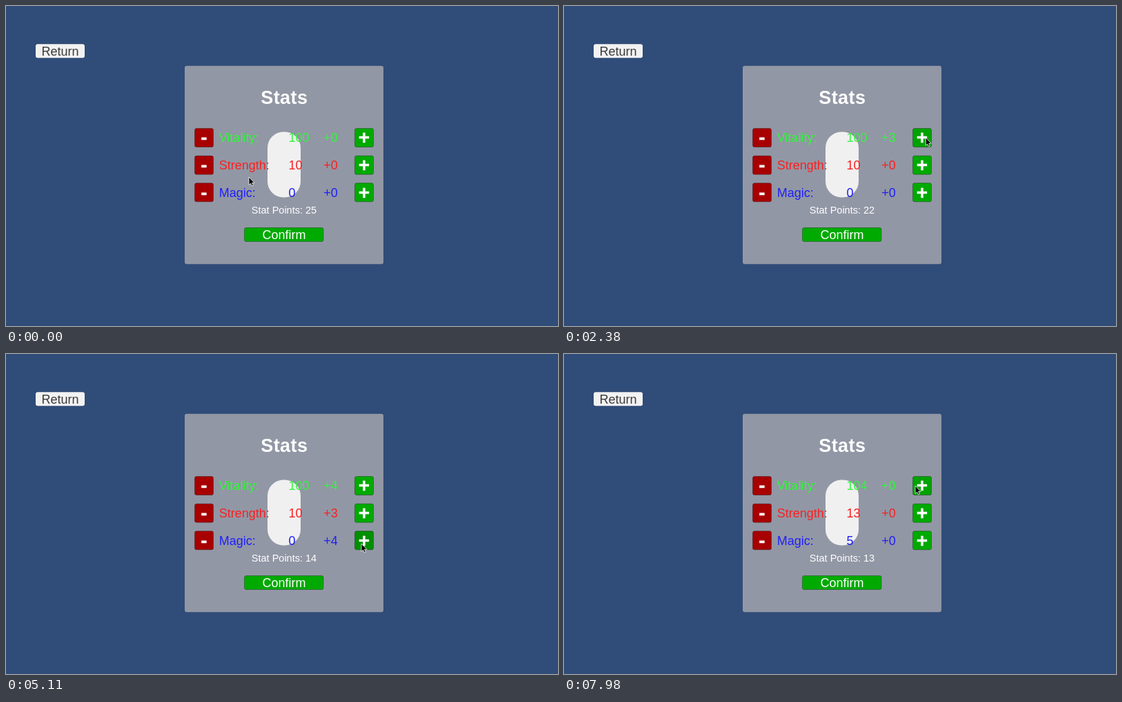
Animation, 800 px wide and 464 px high, one loop 8 s. Source, as an HTML page:

```html
<!DOCTYPE html>
<html lang="en">
<head>
<meta charset="utf-8">
<title>Stats panel</title>
<style>
  html, body { margin: 0; width: 100%; height: 100%; overflow: hidden; background: #304c78; }
  svg { display: block; width: 100%; height: 100%; }
  text { font: 18px "Liberation Sans", Arial, sans-serif; fill: #fff; }
  .middle { text-anchor: middle; }
  .title { font-size: 27px; font-weight: bold; letter-spacing: .4px; }
  .sign { font-size: 28px; font-weight: bold; stroke: #fff; stroke-width: .4px; }
  .small { font-size: 14.5px; }
  .button { stroke: #000; stroke-opacity: .3; }
</style>
</head>
<body>
<svg id="stage" viewBox="0 0 800 464"></svg>
<script>
const stage = document.getElementById('stage');
const LOOP = 8000, STEP = 70;
const GREEN = 170, RED = 168;

function add(tag, attributes, content = '') {
  const node = document.createElementNS('http://www.w3.org/2000/svg', tag);
  for (const name in attributes) node.setAttribute(name, attributes[name]);
  node.textContent = content;
  return stage.appendChild(node);
}
const box = (x, y, width, height, rx, fill, cls = '') =>
  add('rect', { x, y, width, height, rx, fill, class: cls });
const label = (content, x, y, cls = '', fill = '') =>
  add('text', { x, y, class: cls, style: fill && `fill:${fill}` }, content);
const button = (x, y, width, height, fill) =>
  box(x + .5, y + .5, width - 1, height - 1, 2.5, fill, 'button');

box(43, 55.3, 71, 20, 3, '#f2f2f2');
label('Return', 78.5, 71.5, 'middle', '#3a3a3a');
box(259, 86.8, 288, 287.4, 3, '#9297a5');
box(379, 182.5, 48, 95, 23, '#f0f0f0');
label('Stats', 403.3, 142.3, 'middle title');

// Each click time is the moment a point is added to that row.
const rows = [
  { name: 'Vitality:', base: 100, y: 191, color: '#32f53c', clicks: [1820, 2100, 2380, 2660] },
  { name: 'Strength:', base: 10, y: 230.7, color: '#fa2020', clicks: [3290, 3570, 3850] },
  { name: 'Magic:', base: 0, y: 270.3, color: '#2020f5', clicks: [4410, 4620, 4830, 5040 - STEP, 5180] }
];
for (const row of rows) {
  const { y, color } = row;
  button(273, y - 14, 28, 28, `rgb(${RED},0,0)`);
  label('-', 286.8, y + 9.2, 'middle sign');
  row.plus = button(505, y - 14, 28, 28);
  label('+', 519, y + 9.2, 'middle sign');
  label(row.name, 308.7, y + 6.2, '', color);
  row.value = label('', 409.5, y + 6.2, '', color);
  row.bonus = label('', 460.3, y + 6.2, '', color);
}
const points = label('', 403, 301.3, 'middle small');
const confirmButton = button(345, 321, 115.5, 21);
label('Confirm', 403, 338, 'middle');
const CONFIRM_TIME = 6230;

const cursor = add('path', {
  d: 'M0 0V11.5L2.6 9.2L4.4 13L6.3 12.1L4.6 8.4H8Z',
  fill: '#000', stroke: '#fff', 'stroke-width': .8
});

// Time, x, y of the pointer tip.
const path = [
  [0, 352, 248], [1050, 352, 248], [1260, 494, 203], [1470, 496, 202], [1610, 525, 190],
  [2730, 524, 191], [3080, 518, 239], [3150, 518, 240], [3920, 518, 239], [4060, 518, 245],
  [4200, 517, 251], [4410, 515, 274], [5110, 515, 275], [5390, 515, 275], [6020, 435, 329],
  [6160, 434, 329], [6580, 434, 329], [7350, 510, 193], [7980, 509, 191], [LOOP, 509, 191]
];

function pointerAt(time) {
  const i = path.findIndex(key => key[0] > time);
  const [t0, x0, y0] = path[i - 1], [t1, x1, y1] = path[i];
  const p = (time - t0) / (t1 - t0), eased = p * p * (3 - 2 * p);
  return [x0 + (x1 - x0) * eased, y0 + (y1 - y0) * eased];
}

function paintButton(node, [px, py], pressed) {
  const edge = name => +node.getAttribute(name);
  const inside = px >= edge('x') && px <= edge('x') + edge('width') &&
    py >= edge('y') && py <= edge('y') + edge('height');
  const shade = pressed ? .84 : inside ? .95 : 1;
  node.setAttribute('fill', `rgb(0,${Math.round(GREEN * shade)},0)`);
}

const isPressed = (time, click) => time >= click - 2 * STEP && time < click;

function draw(now) {
  const time = Math.floor((now % LOOP) / STEP) * STEP;
  const tip = pointerAt(time);
  const confirmed = time >= CONFIRM_TIME;
  let left = 25;
  for (const row of rows) {
    const spent = row.clicks.filter(click => click <= time).length;
    left -= spent;
    row.value.textContent = row.base + (confirmed ? spent : 0);
    row.bonus.textContent = '+' + (confirmed ? 0 : spent);
    paintButton(row.plus, tip, row.clicks.some(click => isPressed(time, click)));
  }
  points.textContent = `Stat Points: ${left}`;
  paintButton(confirmButton, tip, isPressed(time, CONFIRM_TIME));
  cursor.setAttribute('transform', `translate(${tip})`);
}

const start = performance.now();
function tick() {
  draw(performance.now() - start);
  requestAnimationFrame(tick);
}
tick();
</script>
</body>
</html>
```
